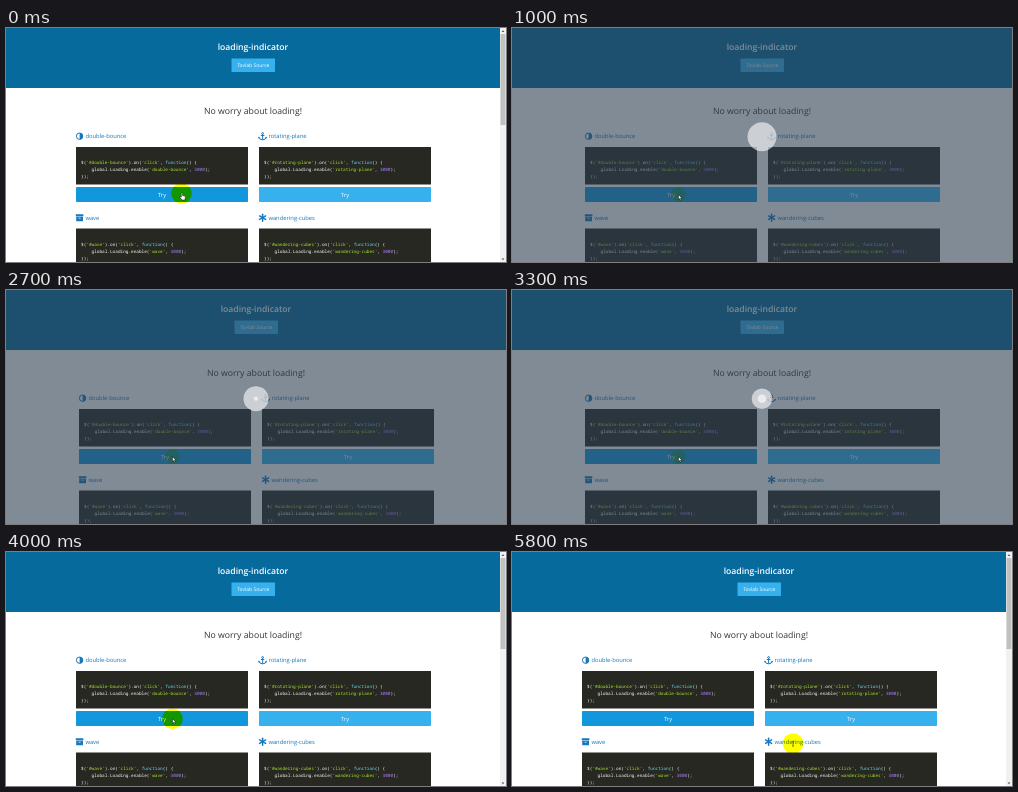
Write an HTML page that moves like this. It is 500x234 px and loops after 6000 ms.

```html
<!DOCTYPE html>
<html lang="en">
<head>
<meta charset="utf-8">
<title>loading-indicator</title>
<style>
  html, body { margin: 0; width: 100%; height: 100%; overflow: hidden; background: #fff; }
  svg { display: block; width: 100vw; height: 100vh; }
  text { font-family: "Open Sans", "Noto Sans", sans-serif; text-rendering: geometricPrecision; white-space: pre; }
  .mid { text-anchor: middle; }
  .white { fill: #fff; }
  .name { font-size: 5.8px; fill: #1878bd; }
  .code { font: 500 4.4px "Noto Sans Mono", "DejaVu Sans Mono", monospace; fill: #f8f8f2; }
  .str { fill: #a6e22e; }
  .key { fill: #66d9ef; }
  .num { fill: #ae81ff; }
  .icon { fill: #1878bd; stroke: #1878bd; stroke-width: 0; }
  .line { fill: none; stroke-width: 1; }
  #glow { fill: #ff0; mix-blend-mode: multiply; }
  #cursor path { fill: #fff; stroke: #000; stroke-width: .45; stroke-linejoin: round; }
  #cursor #beam { fill: none; stroke: #222; stroke-width: .6; }
</style>
</head>
<body>
<svg viewBox="0 0 500 234" preserveAspectRatio="none">
  <rect width="500" height="234" fill="#fff"/>
  <rect width="500" height="60" fill="#076a9d"/>
  <g id="page">
    <text class="mid white" x="247" y="21.6" font-size="8.6" font-weight="600">loading-indicator</text>
    <rect x="225.5" y="30.5" width="43.5" height="13.5" rx=".8" fill="#37b1ee"/>
    <text class="mid white" x="247.3" y="39.2" font-size="5">Tovlab Source</text>
    <text class="mid" x="247" y="86" font-size="8.7" fill="#333">No worry about loading!</text>
  </g>
  <g id="scrollbar">
    <rect x="494" width="6" height="234" fill="#f1f1f1"/>
    <rect x="494.5" y="6" width="5" height="91" fill="#c1c1c1"/>
    <path d="M495.6 4l1.4-1.8 1.4 1.8zM495.6 230.5l1.4 1.8 1.4-1.8z" fill="#555"/>
  </g>
  <circle id="glow"/>
  <g id="overlay">
    <rect width="500" height="234" fill="#2c3e50" opacity=".6"/>
    <circle class="dot" cx="250" cy="108.7" fill="#fff" opacity=".6"/>
    <circle class="dot" cx="250" cy="108.7" fill="#fff" opacity=".6"/>
  </g>
  <g id="cursor">
    <path id="hand" d="M-.2 -.2a.65 .65 0 0 1 1.3 0v2.3l2.1.5q.8.2.7 1.1l-.5 2.8h-3l-2-2.7q-.3-.9.6-.7l.8.6z"/>
    <path id="arrow" d="M0 0v4.8l1.1-1 .8 1.8.8-.4-.8-1.7h1.5z"/>
    <path id="beam" d="M-.9-2.3h.6l.3.3.3-.3h.6M0-2v4.4M-.9 2.7h.6l.3-.3.3.3h.6"/>
  </g>
</svg>
<script>
const $ = id => document.getElementById(id);
const LOOP = 6000, STEP = 100;
const LOAD_FROM = 940, LOAD_TO = 3940;

const spoke = a => `<path class="line" d="M0-3.5V3.5" stroke-linecap="round" style="stroke-width:1.5" transform="rotate(${a})"/>`;
const icons = {
  adjust: '<circle class="line" r="3.2"/><path d="M0-3.2a3.2 3.2 0 0 1 0 6.4z"/>',
  anchor: '<circle class="line" cy="-2.7" r=".9"/><path class="line" d="M0-1.8V3.4M-1.8-.7h3.6M-3.6 1.2q.5 2.4 3.6 2.4t3.6-2.4"/><path d="M-4.2 2.4v-2.2l2 1.6zM4.2 2.4v-2.2l-2 1.6z"/>',
  archive: '<path d="M-3.8-3.4h7.6v2h-7.6zM-3.4-.9h6.8v4.5h-6.8zM-1 0v.7h2v-.7z" fill-rule="evenodd"/>',
  asterisk: [0, 60, 120].map(spoke).join('')
};

const tint = (cls, s) => `<tspan class="${cls}">${s}</tspan>`;
const str = s => tint('str', `'${s}'`);

function card(x, y, name, icon, buttonColor) {
  const lines = [
    [0, `$(${str('#' + name)}).on(${str('click')}, ${tint('key', 'function')}() {`],
    [4, `global.Loading.enable(${str(name)}, ${tint('num', 3000)});`],
    [0, '});']
  ];
  const code = lines.map(([indent, s], i) =>
    `<text class="code" x="${5 + indent * 2.64}" y="${28 + i * 7}">${s}</text>`).join('');
  return `<g transform="translate(${x} ${y})">
    <g class="icon" transform="translate(3.6 .2)">${icons[icon]}</g>
    <text class="name" x="9.4" y="2.2">${name}</text>
    <rect y="11" width="172" height="37.5" fill="#272822"/>${code}
    <rect y="51" width="172" height="15" rx=".8" fill="${buttonColor}"/>
    <text class="mid white" x="86" y="60.8" font-size="5.7">Try</text></g>`;
}

const light = '#37b1ee', active = '#1397dc';
$('page').insertAdjacentHTML('beforeend',
  card(70, 108, 'double-bounce', 'adjust', active) +
  card(253, 108, 'rotating-plane', 'anchor', light) +
  card(70, 189.5, 'wave', 'archive', light) +
  card(253, 189.5, 'wandering-cubes', 'asterisk', light));

const clamp = v => Math.min(1, Math.max(0, v));
const ease = p => p * p * (3 - 2 * p);
const dots = document.querySelectorAll('.dot');

// Pointer stops: time, x, y
const stops = [[0, 175.5, 165.5], [400, 166.5, 166.7], [4900, 166.5, 166.7], [5000, 171, 166.5], [5800, 281, 191.5]];

function pointer(t) {
  let [, x, y] = stops[0];
  for (let i = 1; i < stops.length; i++) {
    const [t0, x0, y0] = stops[i - 1], [t1, x1, y1] = stops[i];
    if (t < t0) break;
    const p = ease(clamp((t - t0) / (t1 - t0)));
    x = x0 + (x1 - x0) * p;
    y = y0 + (y1 - y0) * p;
  }
  return [x, y];
}

function shape(t, x, y) {
  if (t >= 900 && t < 4100) return 'arrow';
  if (y < 174) return 'hand';
  return x > 262 && y > 185 ? 'beam' : 'arrow';
}

const show = (id, on) => $(id).setAttribute('visibility', on ? 'visible' : 'hidden');

function draw(t) {
  const loading = t >= LOAD_FROM && t < LOAD_TO;
  const [x, y] = pointer(t);
  const kind = shape(t, x, y);

  $('page').setAttribute('transform', `translate(${loading ? 3 : 0} 0)`);
  show('scrollbar', !loading);
  $('overlay').style.display = loading ? '' : 'none';

  // Two discs swap sizes once a second
  const phase = Math.max(0, t - LOAD_FROM) / 1000 % 2;
  const k = ease(phase < 1 ? phase : 2 - phase);
  dots[0].setAttribute('r', 14.6 * k);
  dots[1].setAttribute('r', 14.6 * (1 - k));

  const glow = $('glow');
  glow.setAttribute('cx', x);
  glow.setAttribute('cy', y);
  glow.setAttribute('r', loading ? 7.2 : 10.3);
  glow.style.opacity = loading ? .45 : 1;

  $('cursor').setAttribute('transform', `translate(${x} ${y})`);
  for (const id of ['hand', 'arrow', 'beam']) show(id, id === kind);
}

const start = performance.now();
function tick() {
  const t = (performance.now() - start + 5) % LOOP;
  draw(Math.floor(t / STEP) * STEP);
  requestAnimationFrame(tick);
}
tick();
</script>
</body>
</html>
```
